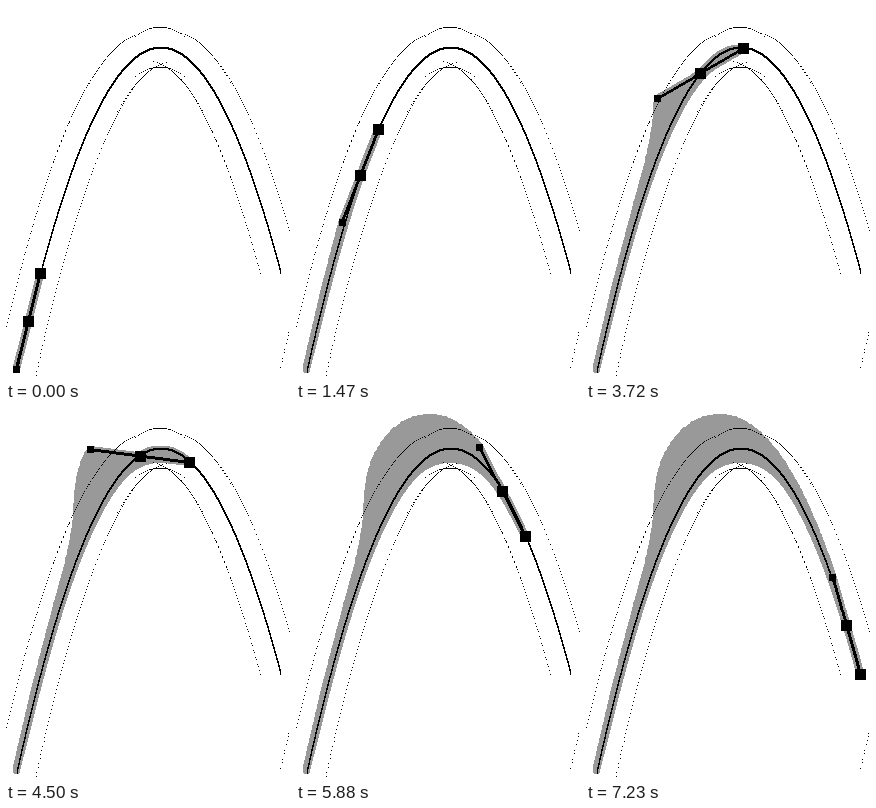
Write an HTML page with a canvas that moves like this. It is 284 px wide and 373 px high and loops after 7260 ms.

```html
<!DOCTYPE html>
<html>
<head>
<meta charset="utf-8">
<style>
html, body { margin: 0; width: 100%; height: 100%; overflow: hidden; background: #fff; }
canvas { display: block; }
</style>
</head>
<body>
<canvas id="stage" width="284" height="373"></canvas>
<script>
const W = 284, H = 373, LOOP = 7260, STEPS = 240;
const X0 = 10, X1 = 274, START = 34, OFFSET = 20;

function layer() {
  const c = document.createElement('canvas');
  c.width = W;
  c.height = H;
  return c;
}

const ctx = document.getElementById('stage').getContext('2d');
const road = layer(), sweep = layer();
const roadCtx = road.getContext('2d'), sweepCtx = sweep.getContext('2d');
sweepCtx.fillStyle = '#999';

const curve = x => 42 + (x - 154) ** 2 / 64;
const row = x => Math.floor(curve(x));

function square(g, x, y, size) {
  const r = (size - 1) / 2;
  g.fillRect(Math.round(x) - r, Math.round(y) - r, size, size);
}

// Pen tip: a square without its corner pixels
function tip(g, x, y, size) {
  const r = (size - 1) / 2;
  x = Math.round(x) - r;
  y = Math.round(y) - r;
  g.fillRect(x, y + 1, size, size - 2);
  g.fillRect(x + 1, y, size - 2, size);
}

function bar(g, a, b, size) {
  const n = Math.ceil(Math.max(Math.abs(a.x - b.x), Math.abs(a.y - b.y)));
  for (let i = 0; i <= n; i++) {
    const k = i / n;
    tip(g, a.x + (b.x - a.x) * k, a.y + (b.y - a.y) * k, size);
  }
}

function dot(x, y) {
  x = Math.round(x);
  if (x < 0) x += W; // the left edge wraps round to the right
  roadCtx.fillRect(x, Math.round(y), 1, 1);
}

function drawRoad() {
  for (let x = X0; x < X1; x++) {
    const y = row(x), next = row(x + 1), slope = next - y;
    roadCtx.fillRect(x + 1, Math.min(y, next) - 1, 1, Math.abs(slope) + 2);
    // Whole-pixel slopes make the borders scatter near the top
    const len = Math.hypot(1, slope);
    const nx = slope / len * OFFSET, ny = -OFFSET / len;
    dot(x + nx, y - 1 + ny);
    dot(x - nx, y - 1 - ny);
  }
}

// Front and middle ride on the curve; the rear extends the same line
function pose(n) {
  const front = { x: START + n, y: row(START + n) };
  const length = 49.72 + 0.8 * (n / STEPS) ** 3;
  let lo = front.x - 60, hi = front.x;
  for (let i = 0; i < 24; i++) {
    const x = (lo + hi) / 2;
    if (Math.hypot(front.x - x, front.y - curve(x)) > length) lo = x;
    else hi = x;
  }
  const mid = { x: lo, y: curve(lo) };
  const rear = { x: 2 * mid.x - front.x, y: 2 * mid.y - front.y };
  return { front, mid, rear };
}

let swept = -1;

function sweepTo(n) {
  if (n < swept) {
    sweepCtx.clearRect(0, 0, W, H);
    swept = -1;
  }
  while (swept < n) {
    const p = pose(++swept);
    bar(sweepCtx, p.rear, p.front, 7);
  }
}

function draw(n) {
  sweepTo(n);
  ctx.fillStyle = '#fff';
  ctx.fillRect(0, 0, W, H);
  ctx.drawImage(sweep, 0, 0);
  ctx.drawImage(road, 0, 0);
  const { front, mid, rear } = pose(n);
  ctx.fillStyle = '#000';
  bar(ctx, rear, front, 3);
  square(ctx, rear.x, rear.y, 7);
  square(ctx, mid.x, mid.y, 11);
  square(ctx, front.x, front.y, 11);
}

function tick() {
  const t = performance.now() % LOOP;
  // The first pose is held for two steps
  draw(Math.min(STEPS, Math.max(0, Math.floor(t / 30) - 1)));
  requestAnimationFrame(tick);
}

drawRoad();
tick();
</script>
</body>
</html>
```
